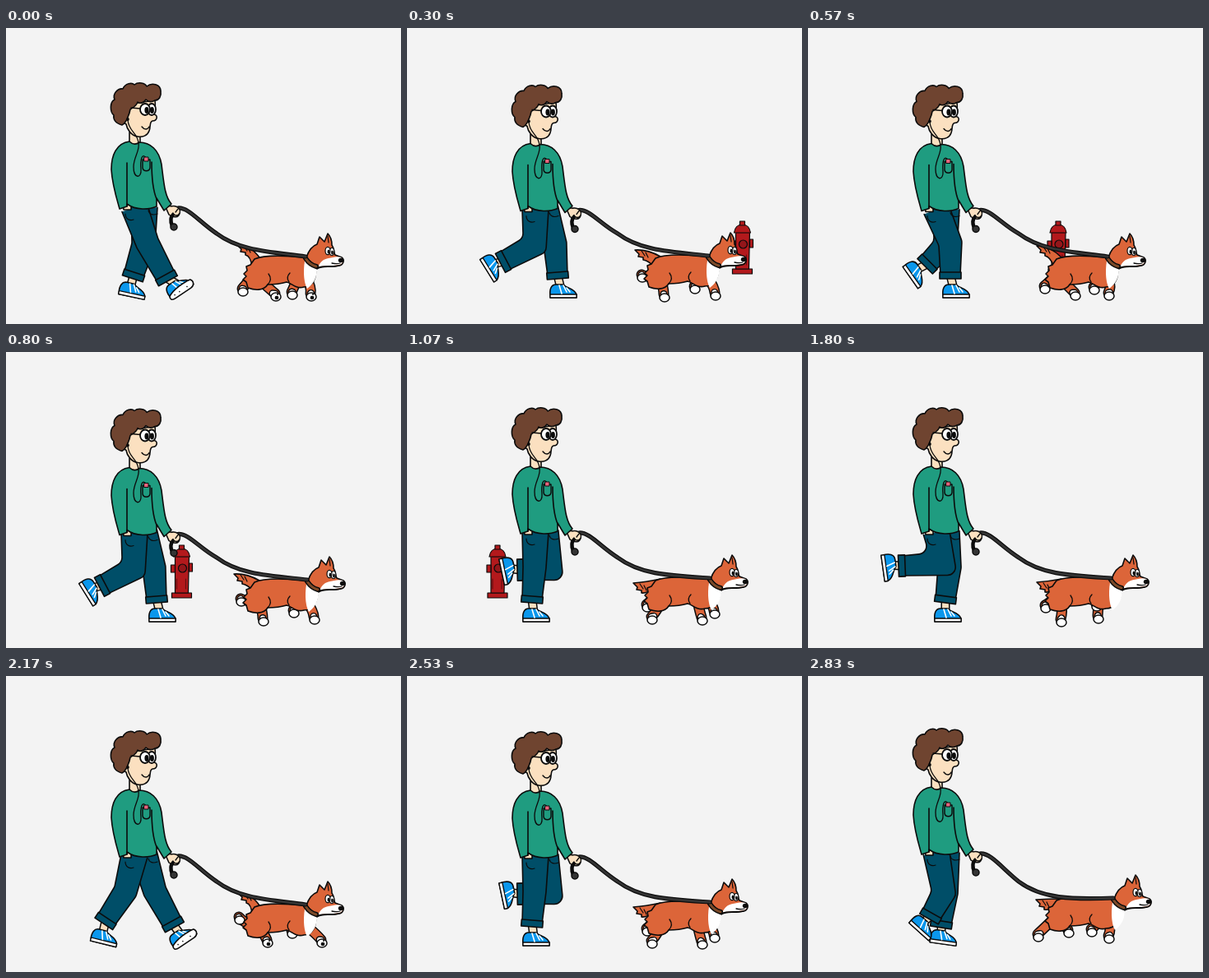
An HTML page with a canvas for the animation above (2.86 s loop, 480x360 px).

```html
<!DOCTYPE html>
<html lang="en">
<head>
<meta charset="utf-8">
<title>Walking the dog</title>
<style>
html, body { margin: 0; width: 100%; height: 100%; overflow: hidden; background: #f3f3f3; }
canvas { display: block; }
</style>
</head>
<body>
<canvas id="stage" width="480" height="360"></canvas>
<script>
const ctx = document.getElementById('stage').getContext('2d');
const LOOP = 2860, FRAMES = 86;
const INK = '#0b0b0b', SKIN = '#fbe0c0', HAIR = '#6f4430', SHIRT = '#1f9c80',
  PANTS = '#004e68', BLUE = '#0b97ec', FUR = '#dc6539', RED = '#b3191c', ROPE = '#343434';

// Eight walking poses: knee x,y, ankle x,y, shoe x,y and tilt in degrees.
const NEAR = [
  [172, 262, 195, 304, 210, 314, -34], [173, 262, 173, 301, 180, 320, 0],
  [155, 262, 152, 301, 157, 320, 0], [151, 264, 136, 300, 139, 319, 4],
  [145, 262, 121, 298, 120, 318, 14], [155, 264, 117, 284, 104, 291, 58],
  [164, 258, 114, 260, 99, 262, 82], [165, 264, 149, 292, 140, 305, 42]
];
const FAR = [
  [167, 264, 155, 301, 154, 319, 12], [167, 265, 145, 287, 131, 299, 55],
  [174, 264, 138, 265, 123, 266, 78], [175, 266, 161, 295, 159, 308, 35],
  [181, 262, 203, 302, 214, 316, -34], [180, 263, 183, 301, 190, 320, 0],
  [172, 262, 167, 301, 170, 320, 0], [168, 264, 162, 302, 165, 318, 8]
];
// Paws: two hind, two front.
const PAWS = [
  [287, 321, 327, 327, 347, 325, 370, 327], [287, 318, 324, 326, 347, 319, 365, 326],
  [291, 311, 297, 326, 358, 327, 373, 319], [285, 304, 308, 326, 351, 321, 380, 322],
  [283, 297, 317, 325, 347, 314, 383, 325], [285, 304, 312, 328, 349, 318, 374, 326],
  [288, 312, 307, 329, 352, 325, 350, 310], [279, 318, 316, 313, 344, 312, 365, 320]
];
const TAILS = [[281, 264], [278, 265], [275, 281], [279, 270], [282, 264], [277, 270], [278, 280], [277, 272]];
const HEADS = [[0, 0], [0, 0], [4, -3], [4, -4], [0, 0], [2, -1], [4, -3], [7, -8]];
const BOB = [0, 2.5, 1, -3];

function shape(d, fill, width = 1.6, ink = INK) {
  const path = new Path2D(d);
  if (fill) { ctx.fillStyle = fill; ctx.fill(path); }
  if (width) { ctx.lineWidth = width; ctx.strokeStyle = ink; ctx.stroke(path); }
}

function oval(x, y, rx, ry, fill, width = 1.5) {
  ctx.beginPath();
  ctx.ellipse(x, y, rx, ry, 0, 0, 7);
  ctx.fillStyle = fill;
  ctx.fill();
  if (width) { ctx.lineWidth = width; ctx.strokeStyle = INK; ctx.stroke(); }
}

// A thick coloured line with an ink edge.
function tube(d, color, width) {
  shape(d, null, width + 3);
  shape(d, null, width, color);
}

function at(x, y, angle, draw) {
  ctx.save();
  ctx.translate(x, y);
  ctx.rotate(angle);
  draw();
  ctx.restore();
}

function trouser(hx, hy, kx, ky, ax, ay) {
  const u = Math.atan2(ky - hy, kx - hx), v = Math.atan2(ay - ky, ax - kx);
  const miter = 14 / Math.cos((u - v) / 2), mid = (u + v) / 2;
  const side = s => [
    [hx - Math.sin(u) * 16 * s, hy + Math.cos(u) * 16 * s],
    [kx - Math.sin(mid) * miter * s, ky + Math.cos(mid) * miter * s],
    [ax - Math.sin(v) * 12 * s, ay + Math.cos(v) * 12 * s]
  ];
  const a = side(1), b = side(-1);
  ctx.beginPath();
  ctx.moveTo(...a[0]);
  ctx.arcTo(...a[1], ...a[2], 10);
  ctx.lineTo(...a[2]);
  ctx.lineTo(...b[2]);
  ctx.arcTo(...b[1], ...b[0], 10);
  ctx.lineTo(...b[0]);
  ctx.fillStyle = PANTS;
  ctx.fill();
  ctx.lineWidth = 1.6;
  ctx.strokeStyle = INK;
  ctx.stroke();
  at(ax, ay, v, () => shape('M-4 -13L4 -13L4 13L-4 13Z', PANTS));
}

function shoe(tilt) {
  shape('M-16 6C-17 -2 -15 -8 -9 -8L0 -8C4 -3 13 -4 16 4L16 8L-16 8Z', BLUE);
  shape('M-16 4L16 4L16 8L-16 8Z', '#fff', 1.3);
  shape('M-5 -7L-2 3M0 -7L4 1M4 -4L8 1', null, 1.6, '#fff');
  if (tilt < -20) {
    shape('M-16 4C-8 0 8 -1 16 1C19 5 16 10 11 10L-11 10C-17 10 -18 7 -16 4Z', '#fff');
    for (const x of [-10, -3, 8]) oval(x, 6, 0.8, 0.8, INK, 0);
  }
}

function leg(hx, hy, [kx, ky, ax, ay, fx, fy, tilt]) {
  tube(`M${ax} ${ay}L${fx - 3} ${fy - 3}`, SKIN, 8);
  at(fx, fy, tilt * Math.PI / 180, () => shoe(tilt));
  trouser(hx, hy, kx, ky, ax, ay);
}

function torso() {
  shape('M142 214L152 215L152 221L143 221Z', SKIN);
  shape('M194 218C202 214 212 219 211 225C210 231 203 231 198 227Z', SKIN);
  shape('M150 127L150 142L163 142L163 127', SKIN);
  shape('M150 138C134 140 128 155 128 172C129 190 134 206 138 220L147 217L147 214C158 222 174 221 183 217' +
    'L183 207L192 222L201 214C193 205 192 190 189 166C186 148 175 139 162 139C158 142 154 142 150 138Z', SHIRT);
  shape('M147 164L147 217M177 163C177 182 178 196 183 208');
  shape('M145 226C145 232 150 235 155 233M173 222C174 227 179 228 184 226', null, 1.2);
}

function head() {
  shape('M147 106C146 98 152 92 160 91L181 88C182 95 181 100 180 105C185 106 184 113 178 113' +
    'C174 114 176 120 174 125C172 131 166 133 160 132C152 131 147 123 146 117C141 114 142 107 147 106Z', SKIN);
  shape('M141 118C133 116 130 111 131 106C126 102 126 90 132 87C129 80 136 73 142 74C145 67 153 66 156 69' +
    'C161 65 169 67 171 71C177 66 188 68 188 77C189 83 186 88 181 88C176 91 172 89 170 87' +
    'C167 92 162 92 160 90C158 96 153 97 151 99C150 105 148 108 147 111C145 114 144 117 141 118Z', HAIR);
  oval(177, 99, 5, 7, '#fff', 1.8);
  oval(169, 99, 6, 7, '#fff', 1.8);
  oval(171, 100, 2.6, 4, INK, 0);
  oval(177.5, 100, 2.4, 4, INK, 0);
  shape('M163 98L152 97M165 120C168 124 172 124 174 120', null, 1.4);
  oval(148, 111, 1.8, 2, INK, 0);
  shape('M148 112C149 126 160 127 161 140C163 149 155 157 155 169C155 184 165 183 164 172' +
    'C163 161 165 150 171 159', null, 1.3);
  shape('M166 160L175 160L175 170C174 175 167 175 166 170Z', SHIRT, 1.4);
  shape('M168 157L173 157L173 162L168 162Z', '#e5647d', 1);
}

function rope([hx, hy], bob) {
  const y = 219 + bob;
  const line = `M209 ${y}C222 ${y - 1} 235 ${y + 17} 256 250C284 271 320 272 ${364 + hx} ${278 + hy}`;
  shape(line, null, 5.2);
  shape(line, null, 2.8, ROPE);
  const grip = `M203 ${y + 8}C199 ${y + 12} 200 ${y + 17} 202 ${y + 22}`;
  shape(grip, null, 4.5);
  oval(204, y + 23, 4, 4, ROPE);
}

function hydrant(x) {
  at(x, 0, 0, () => {
    shape('M-12 293L12 293L12 299L-12 299Z', RED, 1.2);
    shape('M-8 249L9 249L8 293L-8 293Z', RED, 1.2);
    shape('M-10 249C-9 242 -5 239 0 239C5 239 9 242 10 249Z', RED, 1.2);
    shape('M-3 235L3 235L3 240L-3 240ZM-13 259L-8 259L-8 268L-13 268ZM9 257L13 257L13 267L9 267Z', RED, 1.2);
    oval(1, 263, 5, 5, '#93161a', 1.2);
    shape('M-8 249L9 249M-6 276L-6 288M5 276L5 288', null, 1.2, '#651012');
  });
}

function dogLeg(x, y, px, py, bend) {
  const bx = (x + px) / 2 + bend, by = (y + py) / 2;
  tube(`M${x} ${y}Q${bx} ${by} ${px} ${py - 4}`, FUR, 10);
  const sx = bx * 0.4 + px * 0.6, sy = by * 0.4 + py * 0.6;
  tube(`M${sx} ${sy}L${px} ${py - 4}`, '#fff', 6);
  oval(px + 1, py, 6, 5, '#fff');
}

function tail([x, y], dy) {
  const bx = 308, by = 285 + dy;
  shape(`M${bx} ${by - 6}Q${x + 15} ${y - 1} ${x} ${y}L${x + 5} ${y + 5}L${x + 4} ${y + 8}` +
    `L${x + 10} ${y + 9}L${x + 10} ${y + 12}Q${x + 16} ${y + 13} ${bx - 9} ${by + 5}`, FUR);
  shape(`M${x + 8} ${y + 1}l4 6M${x + 13} ${y + 3}l3 6`, null, 1.2);
}

function dogHead() {
  shape('M364 279L377 292C379 302 374 311 366 317C361 309 361 290 364 279Z', '#fff', 0);
  shape('M365 279C368 270 372 265 378 263L381 254L387 260L391 250C395 254 396 260 396 264' +
    'C399 268 398 273 400 276L408 279C412 282 410 288 405 289C394 292 384 288 378 293Z', FUR);
  shape('M379 291C382 284 386 281 392 280C397 279 402 277 407 279C411 282 409 288 404 288C394 291 386 288 379 291Z', '#fff', 0);
  shape('M378 292C386 288 396 291 405 289M396 286C400 287 403 287 406 286', null, 1.3);
  shape('M391 253L392 261', null, 1.2);
  oval(396, 272, 2.8, 4.5, '#fff', 1.2);
  oval(391, 271, 3, 4.7, '#fff', 1.2);
  oval(392, 272, 1.5, 2.6, INK, 0);
  oval(396.5, 273, 1.4, 2.5, INK, 0);
  oval(407, 282.5, 3.2, 2.8, INK, 0);
  tube('M364 280Q369 288 377 290', '#7c4a29', 3);
}

function dog(pose) {
  const [hx, hy] = HEADS[pose], p = PAWS[pose];
  tail(TAILS[pose], hy);
  dogLeg(299, 303 + hy, p[0], p[1], -2);
  dogLeg(308, 306 + hy, p[2], p[3], 2);
  dogLeg(353, 306 + hy, p[4], p[5], 0);
  dogLeg(365, 304 + hy, p[6], p[7], 4);
  if (pose % 4 === 0) for (const i of [2, 6]) {
    oval(p[i] + 2, p[i + 1] + 1, 2.4, 2.2, INK, 0);
    oval(p[i] + 3, p[i + 1] - 3, 1, 1, INK, 0);
  }
  at(0, hy, 0, () => {
    shape(`M302 281C315 275 343 277 ${364 + hx} 279L${376 + hx} 292C${378 + hx} 305 372 315 362 315` +
      'C352 318 347 310 341 309C331 312 324 312 318 312C313 320 302 319 294 316L292 309L288 306L292 302' +
      'L289 299L293 295L292 290L297 288Z', FUR);
    shape('M318 312C322 308 322 303 319 299M344 309C341 305 342 301 345 298', null, 1.3);
  });
  at(hx, hy, 0, dogHead);
}

function draw(t) {
  const frame = Math.floor(t * FRAMES / LOOP);
  const pose = Math.floor((5 * frame + 2) / 9) % 8;
  const bob = BOB[pose % 4];
  ctx.fillStyle = '#f3f3f3';
  ctx.fillRect(0, 0, 480, 360);
  hydrant(304 - (frame - 17) * 194 / 15);
  leg(168, 218 + bob, FAR[pose]);
  leg(156, 218 + bob, NEAR[pose]);
  at(0, bob, 0, () => { torso(); head(); });
  dog(pose);
  rope(HEADS[pose], bob);
  // Fingers close over the lead.
  at(0, bob, 0, () => shape('M201 217C207 215 213 220 211 225C209 229 205 229 203 225M206 224L209 220', SKIN, 1.3));
}

ctx.lineJoin = ctx.lineCap = 'round';
const start = performance.now();
function tick() {
  draw((performance.now() - start) % LOOP);
  requestAnimationFrame(tick);
}
tick();
</script>
</body>
</html>
```
